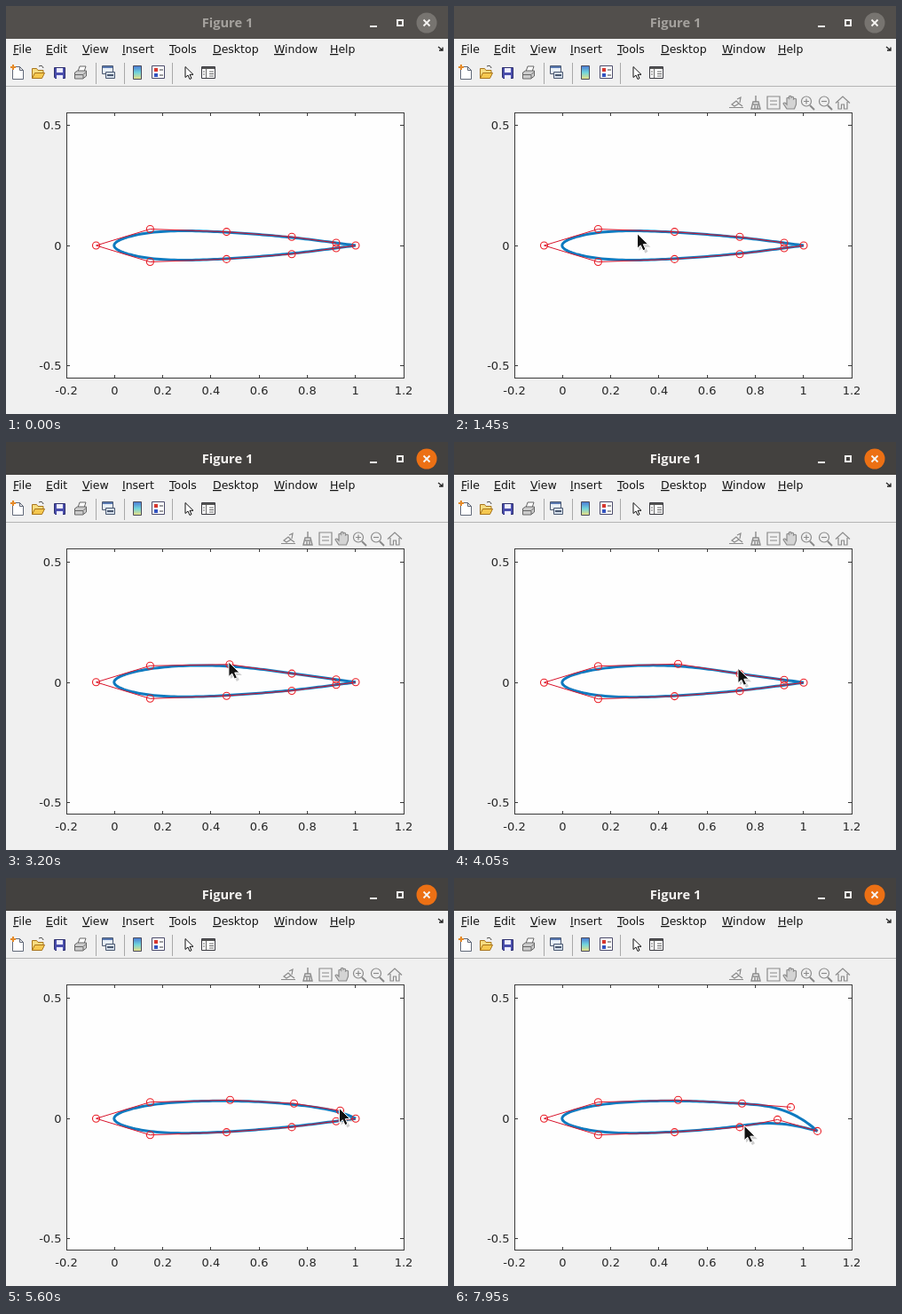
Write an HTML page that moves like this. It is 498x460 px and loops after 8 s.

```html
<!DOCTYPE html>
<html lang="en">
<head>
<meta charset="utf-8">
<title>Figure 1</title>
<style>
  html, body { margin: 0; width: 100%; height: 100%; overflow: hidden; background: #f0f0f0; }
  svg { display: block; }
  .title { font: bold 14.7px "Open Sans", sans-serif; text-anchor: middle; }
  .menu { font: 12.5px "DejaVu Sans", sans-serif; fill: #141414; }
  .tick { font: 13px "DejaVu Sans", sans-serif; fill: #262626; }
  .crisp { shape-rendering: crispEdges; }
</style>
</head>
<body>
<svg width="498" height="460" viewBox="0 0 498 460">
  <linearGradient id="ramp" x2="0" y2="1">
    <stop stop-color="#4a78d4"/><stop offset=".5" stop-color="#70d4dc"/><stop offset="1" stop-color="#eee080"/>
  </linearGradient>
  <rect width="498" height="460" fill="#f0f0f0"/>

  <rect id="bar" width="498" height="37"/>
  <text id="caption" class="title" x="249.5" y="24">Figure 1</text>
  <circle id="close" cx="474" cy="19" r="11.5"/>
  <g fill="none" stroke="#f6f4f2" stroke-width="2">
    <path class="crisp" d="M410 22.5h8M441 16h6v6h-6z"/>
    <path d="M470.5 15.5l7 7m0-7l-7 7" stroke-width="1.8"/>
  </g>

  <g id="menus" class="menu"></g>
  <path d="M487 46l5 4m0-3.5v3.5h-4" fill="none" stroke="#222" stroke-width="1.3"/>

  <g fill="none" stroke="#3a3a40">
    <path class="crisp" d="M0 90.5H498" stroke="#b4b4b4"/>
    <path class="crisp" d="M101.5 64v24M133.5 64v24M187.5 64v24" stroke="#a8a8a8"/>
    <g id="new" stroke="#606878">
      <path d="M7.5 68.500h8l4 4v10h-12zM15.5 68.500v4h4" fill="#fff"/>
      <path d="M8 66v6M5 69h6" stroke="#e58a28" stroke-width="2"/>
    </g>
    <g id="open" stroke="#a9751c">
      <path d="M29.5 81.500v-11h5l1.500 2h6v3" fill="#f6dc80"/>
      <path d="M29.5 81.500l3-6h11l-3 6z" fill="#f5c850"/>
      <path d="M37 68q4-2 5 2" stroke="#444"/>
    </g>
    <g id="save">
      <path d="M54.500 69.500h12v12h-11l-1-1z" fill="#4a4eac" stroke="#2c2e6c"/>
      <path d="M57 70h7v5h-7zM57 78h7v4h-7z" fill="#eef" stroke="none"/>
    </g>
    <g id="print" stroke="#666">
      <path d="M81 74l2-6h7l-2 6z" fill="#fff"/>
      <path d="M77.500 75l3-2h10v6l-4 3h-9z" fill="#ccc"/>
      <path d="M78 77.500h9l3-3M87 78v4"/>
    </g>
    <g id="link" stroke="#4a5870">
      <path d="M108.500 67.500h12v9h-12z" fill="#e8f0f8"/>
      <path d="M109 69h11" stroke="#5878b0" stroke-width="2"/>
      <path d="M112.500 74.500h10v7h-10z" fill="#d4deea"/>
      <path d="M114 78h7" stroke-width="2"/>
    </g>
    <path d="M143.500 67.500h9v15h-9z" fill="url(#ramp)" stroke="#4a4a5a"/>
    <g id="legend">
      <path d="M164.500 67.500h14v14h-14z" fill="#fff" stroke="#4b4b6a"/>
      <path d="M167 70h4v4h-4z" fill="#d83830" stroke="none"/>
      <path d="M167 76h4v4h-4z" fill="#3454c0" stroke="none"/>
      <path d="M173 72h4M173 78h4"/>
    </g>
    <path d="M202 68.500v12l3-2.500 2 4.500 2-1-2-4.200h4z" fill="#fff" stroke="#111"/>
    <g id="panel">
      <path d="M220.500 68.500h15v13h-15z" fill="#fff"/>
      <path d="M221 70h14" stroke="#555" stroke-width="2"/>
      <path d="M225.500 71v10M229 74h5M229 76.500h5M229 79h5M222 74h2M222 77h2" stroke="#666"/>
    </g>
  </g>

  <rect x="68" y="120" width="381" height="300" fill="#fefefe"/>
  <path id="frame" class="crisp" fill="none" stroke="#3a3a3a"/>
  <g id="xlabels" class="tick" text-anchor="middle"></g>
  <g id="yaxis" class="tick" text-anchor="end"></g>

  <g id="axestools" fill="none" stroke="#8a8a8a" stroke-width="1.2">
    <path d="M310 114.500h16M313 111l5-4 3 3-5 3zM319 105l4-2-1 6M321 110l4 3"/>
    <path d="M340 101v7M335 116l2-8h6l2 8zM337 111h6M339 112v4M342 112v4" stroke-width="1.4"/>
    <path d="M353 102h14v14h-14zM356 107h8M356 111h8"/>
    <path d="M375 116l-4-6q1-2 3 0l1 1v-7q1.500-1.500 2.500 0v-2q1.500-1.500 2.500 0v1q1.500-1.500 2.500 0v2q2-1.500 3 0v6l-2 5z" fill="#d4d4d4"/>
    <path d="M401 112l5 5M421 112l5 5" stroke-width="2"/>
    <circle cx="397" cy="107.500" r="5.500"/><path d="M394 107.500h6m-3-3v6"/>
    <circle cx="417" cy="107.500" r="5.500"/><path d="M414 107.500h6"/>
    <path d="M430 109.500l8-7.500 8 7.500M433 108v8h3.500v-5h3v5h3.500v-8"/>
  </g>

  <g id="foil" fill="none">
    <path id="curve" stroke="#0f7abf" stroke-width="3" stroke-linejoin="round"/>
    <path id="polygon" stroke="#d8142c"/>
    <g id="markers" stroke="#ea1c24" stroke-width="1.1"></g>
  </g>

  <g id="cursor">
    <path d="M2 3v16l4-3 3 6 3-2-3-5h6z" fill="#777" opacity=".35"/>
    <path d="M0 0v16.500l3.800-3.400 2.700 6 3-1.400-2.700-5.700h5.400z" fill="#111" stroke="#fff"/>
  </g>
</svg>

<script>
const LOOP = 8000, ENTER = 500, TOOLS = 850, FOCUS = 1750;
const UNIT = 271.4, X0 = 122.3, Y0 = 270;
const GRIP = { x: -1, y: -2.7 };
const $ = id => document.getElementById(id);
const set = (id, attrs) => Object.entries(attrs).forEach(([k, v]) => $(id).setAttribute(k, v));
const ease = u => u * u * (3 - 2 * u);

// Symmetric foil: trailing edge, upper side, nose, lower side.
const upper = [[372, 3], [322, 9.7], [248.5, 15.4], [162.4, 18.5]];
const HANDLES = [
  { x: 394, y: Y0 },
  ...upper.map(([x, h]) => ({ x, y: Y0 - h })),
  { x: 101.5, y: Y0 },
  ...upper.map(([x, h]) => ({ x, y: Y0 + h })).reverse()
];

const DRAGS = [
  { handle: 3, grab: 1750, release: 3450, dx: 4, dy: -5.5 },
  { handle: 2, grab: 4250, release: 4950, dx: 2.5, dy: -7.3 },
  { handle: 1, grab: 5300, release: 5800, dx: 7.5, dy: -9.8 },
  { handle: 0, grab: 6150, release: 6850, dx: 15.5, dy: 14.2 },
  { handle: 9, grab: 7250, release: 7700, dx: -7.5, dy: -1.8 }
];

// Pointer stops: free hovering plus both ends of every drag.
const STOPS = [
  { t: ENTER, x: 300, y: 440 }, { t: 1400, x: 204, y: 257 },
  { t: 4050, x: 320, y: 254 }, { t: 7950, x: 327, y: 278 },
  ...DRAGS.flatMap(({ handle, grab, release, dx, dy }) => {
    const x = HANDLES[handle].x + GRIP.x, y = HANDLES[handle].y + GRIP.y;
    return [{ t: grab, x, y, dragging: true }, { t: release, x: x + dx, y: y + dy }];
  })
].sort((a, b) => a.t - b.t);

function pointer(t) {
  const a = STOPS.findLast(s => s.t <= t) || STOPS[0];
  const b = STOPS.find(s => s.t > t) || a;
  const u = a === b ? 0 : Math.max(0, (t - a.t) / (b.t - a.t));
  const k = a.dragging ? u : ease(u);
  return { x: a.x + (b.x - a.x) * k, y: a.y + (b.y - a.y) * k };
}

function handlesAt(t) {
  const points = HANDLES.map(p => ({ ...p }));
  for (const { handle, grab, release, dx, dy } of DRAGS) {
    const u = Math.max(0, Math.min(1, (t - grab) / (release - grab)));
    points[handle].x += dx * u;
    points[handle].y += dy * u;
  }
  return points;
}

// Clamped uniform cubic B-spline by de Boor's algorithm.
function spline(points, u) {
  const spans = points.length - 3;
  const knot = i => Math.max(0, Math.min(spans, i - 3));
  const k = Math.min(spans - 1, Math.floor(u)) + 3;
  const d = points.slice(k - 3, k + 1);
  for (let r = 1; r <= 3; r++)
    for (let j = 3; j >= r; j--) {
      const lo = knot(j + k - 3), a = (u - lo) / (knot(j + 1 + k - r) - lo);
      const mix = axis => (1 - a) * d[j - 1][axis] + a * d[j][axis];
      d[j] = { x: mix('x'), y: mix('y') };
    }
  return d[3];
}

const line = points => 'M' + points.map(p => `${p.x.toFixed(2)} ${p.y.toFixed(2)}`).join('L');

function build() {
  const menus = { File: 8, Edit: 45, View: 86, Insert: 131, Tools: 184, Desktop: 233, Window: 302, Help: 365 };
  $('menus').innerHTML = Object.entries(menus).map(([name, x]) =>
    `<text x="${x}" y="53"><tspan text-decoration="underline">${name[0]}</tspan>${name.slice(1)}</text>`).join('');

  let frame = 'M68.5 120.5H448.5V419.5H68.5z', labels = '';
  for (let i = -1; i <= 6; i++) {
    const x = X0 + i * UNIT / 5;
    labels += `<text x="${x}" y="438">${+(i / 5).toFixed(1)}</text>`;
    if (i >= 0 && i < 6) frame += `M${Math.floor(x) + .5} 121v3m0 292v3`;
  }
  set('frame', { d: frame });
  $('xlabels').innerHTML = labels;

  $('yaxis').innerHTML = [.5, 0, -.5].map(v => {
    const y = Y0 - v * UNIT;
    return `<text x="62.5" y="${y + 4.7}">${v}</text>` +
      `<path class="crisp" d="M68 ${Math.floor(y) + .5}h4m372 0h4" stroke="#3a3a3a"/>`;
  }).join('');
  $('markers').innerHTML = HANDLES.map(() => '<circle r="4"/>').join('');
}

function draw(t) {
  const focused = t >= FOCUS;
  set('bar', { fill: focused ? '#43413f' : '#524f4c' });
  set('caption', { fill: focused ? '#f6f4f2' : '#a5a29e' });
  set('close', { fill: focused ? '#ec7014' : '#777470' });
  set('axestools', { visibility: t >= TOOLS ? 'visible' : 'hidden' });

  const points = handlesAt(t), closed = [...points, points[0]];
  const spans = closed.length - 3;
  set('curve', { d: line(Array.from({ length: 161 }, (_, i) => spline(closed, i * spans / 160))) });
  set('polygon', { d: line(closed.slice(1)) });
  [...$('markers').children].forEach((c, i) => {
    c.setAttribute('cx', points[i].x);
    c.setAttribute('cy', points[i].y);
  });

  // The axes stay centred on the vertical extent of the handles.
  const ys = points.map(p => p.y);
  const shift = Y0 - (Math.min(...ys) + Math.max(...ys)) / 2;
  set('foil', { transform: `translate(0 ${shift})` });
  set('yaxis', { transform: `translate(0 ${Math.round(shift)})` });

  const { x, y } = pointer(t);
  set('cursor', {
    transform: `translate(${x} ${y + shift})`,
    visibility: t >= ENTER ? 'visible' : 'hidden'
  });
}

build();
const start = performance.now();
function tick() {
  draw((performance.now() - start) % LOOP);
  requestAnimationFrame(tick);
}
tick();
</script>
</body>
</html>
```
